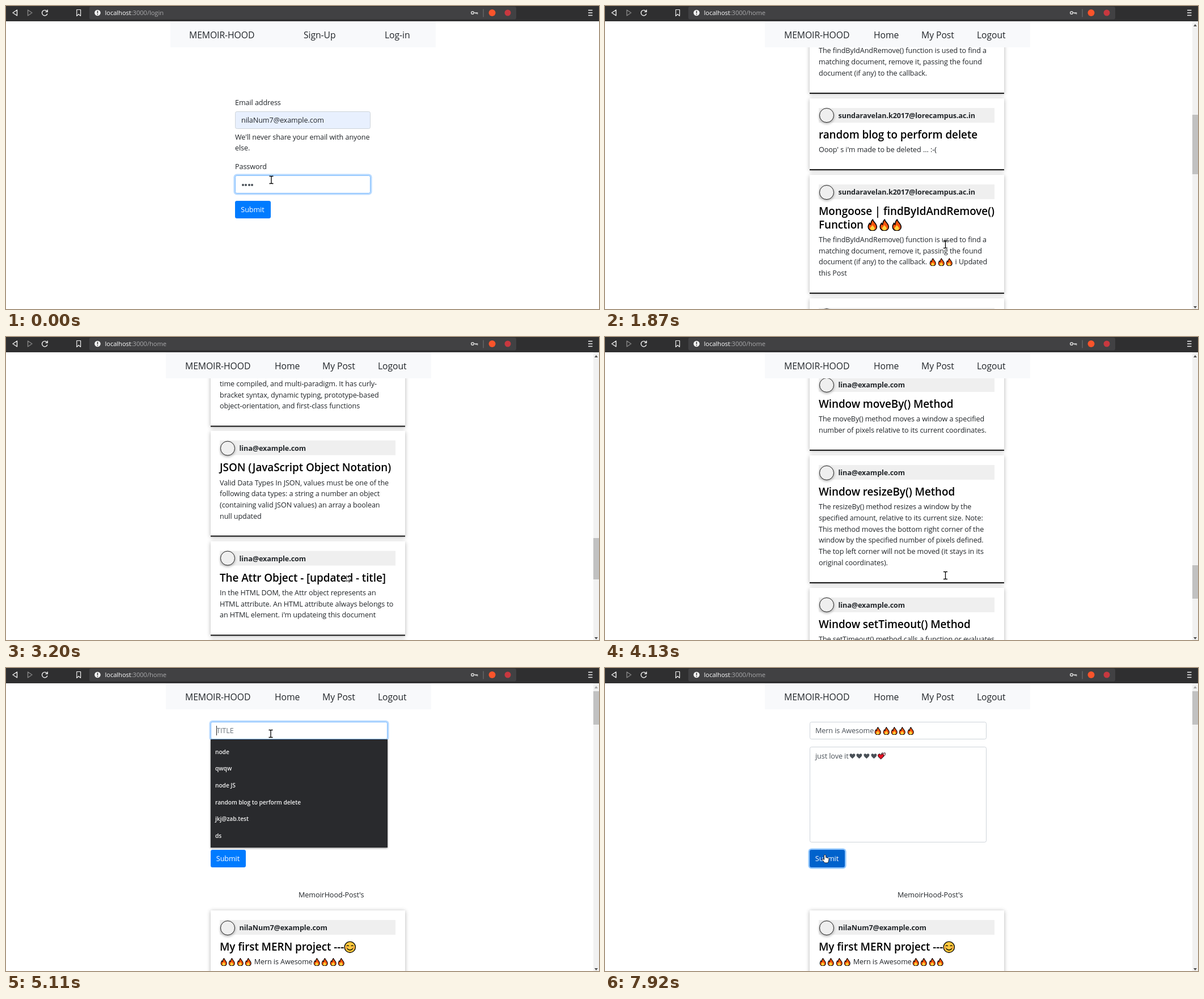
An HTML page that plays this animation: 1046x535 px, repeating every 8000 ms.

```html
<!DOCTYPE html>
<html lang="en">
<head>
<meta charset="utf-8">
<title>Blog</title>
<style>
html, body { margin: 0; width: 100%; height: 100%; overflow: hidden; background: #fff; }
#stage { position: relative; width: 1046px; height: 535px; overflow: hidden; background: #fff;
  font: 12.6px "Open Sans", "Noto Sans", sans-serif; letter-spacing: -.006em; color: #212529; }
#stage div, #stage > svg { position: absolute; box-sizing: border-box; }
.t { white-space: pre; line-height: 24px; height: 24px; }
.layer { left: 0; top: 0; width: 1046px; height: 535px; }
.field { border: 1px solid #ced4da; border-radius: 3.3px; background: #fff; }
.focus { border-color: #80bdff; box-shadow: 0 0 0 2.6px rgba(0,123,255,.28); }
.btn { width: 62.5px; height: 31px; border-radius: 3.3px; background: #007bff; }
.btn.hover { background: #0069d9; }
.btn.on { background: #0062cc; box-shadow: 0 0 0 2.6px rgba(38,143,255,.5); }
.card { left: 361px; width: 343px; background: #fff; border-bottom: 2px solid #111; box-shadow: 0 1px 7px rgba(0,0,0,.3); }
.head { left: 16px; top: 17px; width: 310px; height: 26px; background: #efefef; }
.face { left: 17px; top: 17.5px; width: 26px; height: 26px; border: 1px solid #222; border-radius: 50%; background: #efefef; box-shadow: 0 2px 4px rgba(0,0,0,.3); }
.e { width: 1.14em; height: 1.14em; vertical-align: -.24em; }
.h { width: 12.8px; height: 11px; vertical-align: -1.5px; }
.caret { display: inline-block; width: 1px; height: 17px; margin-right: -1px; background: #222; vertical-align: -4px; }
</style>
</head>
<body>
<div id="stage"></div>
<script>
const LOOP = 8000;
const stage = document.getElementById('stage');
const $ = id => document.getElementById(id);

const icon = (cls, body) => `<svg class="${cls}" viewBox="0 0 16 16">${body}</svg>`;
const FIRE = icon('e', '<path d="M8.4.8C9 4 13.6 6 13.6 10.3c0 3.2-2.5 5-5.6 5S2.4 13.3 2.4 10.2c0-2.2 1-3.4 1.8-4.7.6.8.8 1.5 1.4 1.8C6.2 5 6 2.6 8.4.8z" fill="#f7530c" stroke="#000" stroke-width="1.2"/><path d="M8 7.6c.5 2.2 3 2.8 3 5C11 14 9.7 14.7 8 14.7S5 14 5 12.4c0-1.8 2.6-2.6 3-4.8z" fill="#ffd23d"/>');
const SMILE = icon('e', '<circle cx="8" cy="8" r="7.2" fill="#ffc83d" stroke="#000" stroke-width="1"/><path d="M3.6 6.8q1.5-2 3 0M9.4 6.8q1.5-2 3 0M4.2 9.8q3.8 4.2 7.6 0" fill="none" stroke="#000" stroke-width="1"/><path d="M2.4 9h2M11.6 9h2" stroke="#f0734c" stroke-width="1.3"/>');
const heartPath = 'M8 14.5C3 10.5.8 8 .8 5.2.8 1 6.3.5 8 4c1.7-3.5 7.2-3 7.2 1.2 0 2.8-2.2 5.3-7.2 9.3z';
const HEART = icon('h', `<path d="${heartPath}" fill="#495057"/>`);
const HEARTS = icon('e', `<path d="${heartPath}" transform="translate(7 1)scale(.56)" fill="#f4b6c0" stroke="#000" stroke-width="1.8"/><path d="${heartPath}" transform="translate(0 3)scale(.78)" fill="#e81224" stroke="#000" stroke-width="1.4"/>`);
const CARET = '<span class="caret"></span>';
const rich = s => s.replace(/\^/g, FIRE).replace(/~/g, SMILE);

// y is the middle of the line
const text = (x, y, s, css = '', id = '') =>
  `<div class="t" id="${id}" style="left:${x}px;top:${y - 12}px;${css}">${rich(s)}</div>`;
const box = (cls, x, y, w, h, id = '', css = '') =>
  `<div class="${cls}" id="${id}" style="left:${x}px;top:${y}px;width:${w}px;height:${h}px;${css}"></div>`;
const button = (x, y, id = '') =>
  `<div class="btn" id="${id}" style="left:${x}px;top:${y}px">${text(10.3, 16.3, 'Submit', 'color:#fff')}</div>`;

const MAIL = ['nilaNum7@example.com', 'sundaravelan.k2017@lorecampus.ac.in', 'lina@example.com'];
const FIND = 'The findByIdAndRemove() function is used to find a/matching document, remove it, passing the found/document (if any) to the callback.';
const POSTS = [
  [0, 'My first MERN project ---~', '^^^^ Mern is Awesome^^^^'],
  [1, 'node JS', 'Node.js is a JavaScript runtime.'],
  [1, 'Mongoose | findByIdAndRemove()/Function', FIND],
  [1, 'random blog to perform delete', "Ooop' s i'm made to be deleted ... :-("],
  [1, 'Mongoose | findByIdAndRemove()/Function ^^^', FIND + ' ^^^ i Updated/this Post'],
  [1, 'What is Node.js', 'Node.js is an open-source server environment/that runs on various platforms. It uses/asynchronous programming and can generate/dynamic page content, or create, open, read and/write files on the server.'],
  [1, 'Express Routing', 'Routing refers to how the endpoints of an/application respond to client requests. Routes are/defined using methods of the app object that/correspond to HTTP methods, with a callback/function for each of them.'],
  [2, 'React Components', 'Components are independent and reusable bits of/code. They serve the same purpose as functions,/but work in isolation and return HTML through a/render function. They come in two types, class/and function components.'],
  [2, 'MongoDB Documents', 'A record in MongoDB is a document, which is a/data structure composed of field and value pairs./The values of fields may include other/documents and arrays.'],
  [2, 'JavaScript', 'JavaScript, often abbreviated as JS, is a/programming language that conforms to the/ECMAScript specification. JavaScript is/high-level, often just-in-/time compiled, and multi-paradigm. It has curly-/bracket syntax, dynamic typing, prototype-based/object-orientation, and first-class functions'],
  [2, 'JSON (JavaScript Object Notation)', 'Valid Data Types In JSON, values must be one of the/following data types: a string a number an object/(containing valid JSON values) an array a boolean/null updated'],
  [2, 'The Attr Object - [updated - title]', "In the HTML DOM, the Attr object represents an/HTML attribute. An HTML attribute always belongs to/an HTML element. i'm updateing this document"],
  [2, 'Window open() Method', 'The open() method opens a new browser window,/or a new tab, depending on the settings and the/parameter values. Use the close() method to close/the window. The method returns a reference to the/newly created window, or null if the call to open/it has failed.'],
  [2, 'Window confirm() Method', 'The confirm() method displays a dialog box with a/specified message, along with an OK and a Cancel/button. A confirm box is often used if you want/the user to verify or accept something. It takes/the focus away from the current window until the/box is closed.'],
  [2, 'Window moveBy() Method', 'The moveBy() method moves a window a specified/number of pixels relative to its current coordinates.'],
  [2, 'Window resizeBy() Method', 'The resizeBy() method resizes a window by the/specified amount, relative to its current size. Note:/This method moves the bottom right corner of the/window by the specified number of pixels defined./The top left corner will not be moved (it stays in its/original coordinates).'],
  [2, 'Window setTimeout() Method', 'The setTimeout() method calls a function or evaluates/an expression after a specified number of/milliseconds.'],
  [2, 'Window alert() Method', 'The alert() method displays an alert box.'],
  [2, 'Window close() Method', 'The close() method closes the current window.'],
  [2, 'Window stop() Method', 'The stop() method stops window loading.'],
];

const tops = [], ends = [];
let y = 428;
const cards = POSTS.map(([who, title, body], i) => {
  const heads = title.split('/'), lines = body.split('/');
  const bodyY = 91.2 + 23.6 * (heads.length - 1);
  const h = bodyY + 35.3 + 19.7 * (lines.length - 1);
  tops[i] = y;
  ends[i] = y + h;
  const html = `<div class="card" style="top:${y}px;height:${h + 1}px"><div class="head"></div><div class="face"></div>` +
    text(50.5, 31, MAIL[who], 'font-weight:700') +
    heads.map((s, k) => text(16, 64 + 23.6 * k, s, 'font-size:18.9px;font-weight:600;color:#000')).join('') +
    lines.map((s, k) => text(16, bodyY + 19.7 * k, s)).join('') + '</div>';
  y += h + 8.8;
  return html;
}).join('');

const nav = (x, items) => box('', x, 27, 468, 46, '', 'background:#f8f9fb') +
  items.map(([tx, s]) => text(tx, 51, s, 'font-size:15.74px')).join('');
const BRAND = 'MEMOIR-HOOD';
const HINTS = ['node', 'qwqw', 'node JS', 'random blog to perform delete', 'jkj@zab.test', 'ds'];

const login = nav(290, [[323, BRAND], [525, 'Sign-Up'], [668, 'Log-in']]) +
  text(404, 170.5, 'Email address') +
  box('field', 404, 186, 239, 31, '', 'background:#e8f0fe') + text(415, 202, MAIL[0]) +
  text(404, 231.5, "We'll never share your email with anyone") + text(404, 251, 'else.') +
  text(404, 284, 'Password') + box('field focus', 404, 299, 239, 32) +
  [0, 1, 2, 3].map(i => box('', 415.8 + 5.4 * i, 313.8, 4, 4, '', 'border-radius:50%;background:#495057')).join('') +
  button(404, 344);

const home = '<div class="layer" id="scroll">' +
  box('field', 360.5, 95, 312.5, 31, 'titleBox') + text(371, 111, '', '', 'title') +
  box('field', 360.5, 139, 312.5, 169, 'bodyBox') + text(371, 155.5, '', '', 'body') +
  button(360.5, 321, 'send') +
  text(516, 401, BRAND[0] + "emoirHood-Post's", 'font:32.8px/24px "Liberation Sans",Arial,sans-serif;letter-spacing:0;transform:translateX(-50%)') +
  cards +
  '<div id="hints" style="left:360.5px;top:126px;width:312.5px;height:191px;background:#292a2d;box-shadow:0 1px 3px rgba(0,0,0,.5)">' +
  HINTS.map((s, i) => text(8.5, 21.7 + 29.6 * i, s, 'font-size:10.25px;font-weight:600;color:#f1f1f1')).join('') + '</div></div>' +
  nav(282, [[316, BRAND], [474, 'Home'], [558, 'My Post'], [656, 'Logout']]) +
  box('', 1036, 27, 10, 508, '', 'background:#f1f1f1') + box('', 1036, 41, 10, 59, 'thumb', 'background:#c1c1c1') +
  '<svg class="layer" style="position:absolute" width="1046" height="535"><path id="up" d="M1038 36l3-4 3 4z"/><path d="M1038 530l3 4 3-4z" fill="#505050"/></svg>';

const bar = `<svg width="1046" height="27" style="left:0;top:0">
<rect width="1046" height="27" fill="#2f2f30"/><rect x="147" y="1" width="753" height="22.5" rx="3" fill="#414143"/>
<g fill="none" stroke="#f0f0f0" stroke-width="1.4" stroke-linejoin="round">
<path d="M12 12l7.5-5v10z"/><path d="M46 12l-7.5-5v10z" stroke="#858585"/>
<path d="M72.2 9.2A4.8 4.8 0 1 0 73 13.5M73.3 6.6v3.8h-3.8"/>
<path d="M124.8 6.5h6.8v11l-3.4-3-3.4 3z" stroke-width="1.2"/>
<path d="M1027 7.5h7.5M1027 12h7.5M1027 16.5h7.5"/></g>
<circle cx="161.500" cy="12" r="5.300" fill="#f4f4f4"/><path d="M161.500 8.500v4.300M161.500 14v1.500" stroke="#333" stroke-width="1.500"/>
<g fill="none" stroke="#d0d0d0" stroke-width="1.600"><circle cx="823" cy="12" r="2.300"/><path d="M825.500 12h6v2.500M829 12v2"/></g>
<path d="M842 5.500v14" stroke="#777"/>
<circle cx="857.500" cy="12" r="6" fill="#fb542b"/><circle cx="885" cy="12" r="5.500" fill="#c8383f"/></svg>` +
  text(174.5, 12, '', 'font-size:11.2px;color:#a9a9ab', 'url');

const POINTER = {
  ibeam: '<path d="M-3.500-6.500h2.500q1 0 1 1 0-1 1-1h2.500M0-5.500v11M-3.500 6.500h2.500q1 0 1-1 0 1 1 1h2.500" fill="none" stroke="#000" stroke-width="1.300"/>',
  arrow: '<path d="M0 0v11l2.600-2.400 1.800 3.800 1.600-.8-1.800-3.600h3.400z" fill="#fff" stroke="#222" stroke-width=".8"/>',
  hand: '<path d="M-2-6.500q1.500-1.500 3 0v4l4 .9q1.600.4 1.400 2.200l-.8 4.400q-.3 2-2 2h-3.400q-1.200 0-2-1l-3.600-4.600q-.2-1.800 1.600-1.200l1.800 1.400z" fill="#fff" stroke="#111" stroke-width=".9"/>',
};

stage.innerHTML = `<div class="layer" id="login">${login}</div><div class="layer" id="home">${home}</div>${bar}` +
  '<svg width="1046" height="535" style="left:0;top:0"><g id="mouse"></g></svg>';
const cardEls = [...document.querySelectorAll('.card')];

// n even jumps, the first at a and the last at b
function step(t, a, b, n) {
  if (t < a) return 0;
  if (t >= b) return 1;
  return (Math.floor((t - a) / (b - a) * (n - 1)) + 1) / n;
}
const track = (t, start, moves) => moves.reduce((v, [a, b, n, ...to]) => {
  const p = step(t, a, b, n);
  return v.map((q, i) => q + (to[i] - q) * p);
}, start);
const count = (t, times) => times.filter(a => t >= a).length;
const during = (t, a, b) => t >= a && t < b;

const docEnd = n => ends[n - 1] + 28;
const bottom = n => docEnd(n) - 535;
const SCROLL = [
  [940, 1250, 5, 520], [1410, 1480, 2, tops[3] - 163],
  [2490, 2800, 5, bottom(10)],
  [3030, 3200, 3, tops[10] - 166], [3270, 3660, 6, bottom(15)],
  [3980, 4130, 3, tops[15] - 209], [4200, 4350, 3, bottom(20)],
  [4430, 4740, 5, 700], [4820, 4892, 2, 0],
];
const MOUSE = [
  [470, 630, 3, 436, 362], [790, 940, 3, 600.5, 421], [4965, 5037, 2, 467, 116],
  [6490, 6490, 1, 425, 166], [7450, 7690, 4, 379, 334], [7920, 7920, 1, 388.5, 337],
];
const KINDS = [[0, 'ibeam'], [625, 'hand'], [710, 'arrow'], [1480, 'ibeam'], [2490, 'arrow'], [3660, 'ibeam'],
  [4200, 'arrow'], [5037, 'ibeam'], [7600, 'arrow'], [7690, 'hand']];

const last = {};
function put(id, html) {
  if (last[id] !== html) $(id).innerHTML = last[id] = html;
}
const show = (el, on) => { el.style.display = on ? '' : 'none'; };
const hint = s => `<span style="color:#6c757d">${s}</span>`;
const typed = s => `<span style="color:#495057">${s}</span>`;

function draw(t) {
  const isHome = t >= 710;
  show($('login'), !isHome);
  show($('home'), isHome);
  put('url', `<span style="color:#fff">localhost</span>:3000/${isHome ? 'home' : 'login'}`);

  const loaded = 5 * count(t, [790, 1870, 2880, 3980]);
  const [top] = track(t, [0], SCROLL);
  cardEls.forEach((el, i) => show(el, i < loaded));
  $('scroll').style.transform = `translateY(${-top}px)`;
  const scale = 480 / ((loaded ? docEnd(loaded) : 535) - 27);
  $('thumb').style.top = 41 + top * scale + 'px';
  $('thumb').style.height = 508 * scale + 'px';
  $('up').setAttribute('fill', top > 0 ? '#505050' : '#a3a3a3');

  const inTitle = during(t, 5110, 6490), inBody = during(t, 6490, 7850);
  $('titleBox').classList.toggle('focus', inTitle);
  $('bodyBox').classList.toggle('focus', inBody);
  show($('hints'), during(t, 5110, 5260));
  const fires = FIRE.repeat(count(t, [5330, 5640, 5810, 6030, 6180]));
  const titleCaret = inTitle ? CARET : '';
  put('title', t < 5260 ? titleCaret + hint('TITLE') : typed('Mern is Awesome' + fires + titleCaret));

  const words = ['just ', 'love ', 'it'].slice(0, count(t, [6720, 6810, 6900])).join('');
  const hearts = count(t, [7050, 7130, 7210, 7290, 7370]);
  const bodyCaret = inBody ? CARET : '';
  put('body', words
    ? typed(words + HEART.repeat(Math.min(hearts, 4)) + (hearts > 4 ? HEARTS : '') + bodyCaret)
    : bodyCaret + hint('CONTENT'));
  $('send').className = 'btn' + (t >= 7850 ? ' on' : t >= 7690 ? ' hover' : '');

  const [mx, my] = track(t, [468, 307], MOUSE);
  put('mouse', POINTER[KINDS[count(t, KINDS.map(k => k[0])) - 1][1]]);
  $('mouse').setAttribute('transform', `translate(${mx} ${my})`);
}

const begin = performance.now();
function loop() {
  draw((performance.now() - begin) % LOOP);
  requestAnimationFrame(loop);
}
loop();
</script>
</body>
</html>
```
